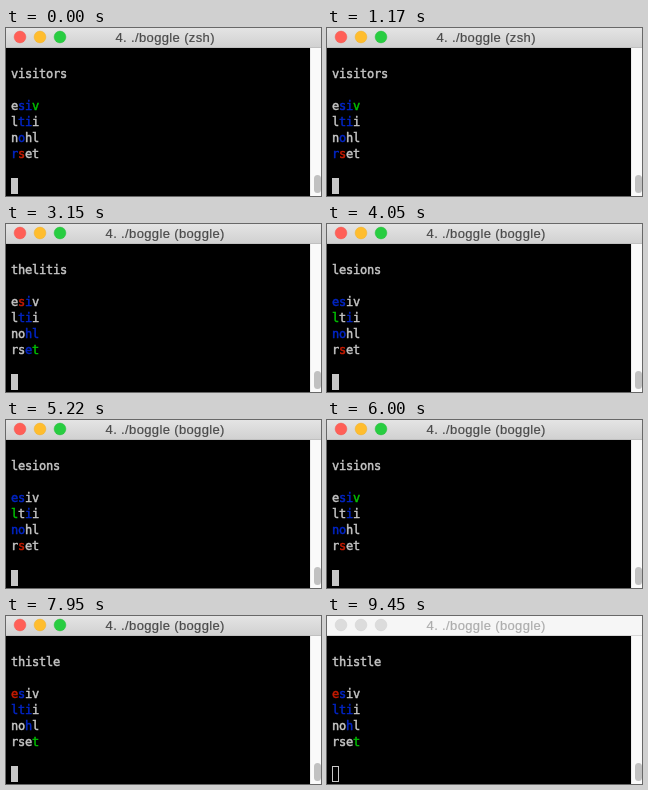
Write an HTML page that moves like this. It is 315x168 px and loops after 9.55 s.

```html
<!DOCTYPE html>
<html lang="en">
<head>
<meta charset="utf-8">
<title>Word grid in a terminal</title>
<style>
  html, body { margin: 0; width: 100%; height: 100%; overflow: hidden; background: #000; }
  svg { display: block; width: 100vw; height: 100vh; }
  .cells { font: 12px "DejaVu Sans Mono", monospace; color: #c7c7c7; }
  .cells text { fill: currentColor; stroke: currentColor; stroke-width: .45; }
  .cells .start { color: #00c200; }
  .cells .mid { color: #0225c7; }
  .cells .end { color: #c91b00; }
  .title {
    font: 13px "Liberation Sans", Arial, sans-serif; letter-spacing: .36px; text-anchor: middle;
    color: #4a4a4a; fill: currentColor; stroke: currentColor; stroke-width: .2;
  }
  .cursor { fill: #c7c7c7; }
  .light { stroke-width: .5; }
  .idle .bar { fill: #f6f6f6; }
  .idle .edge { fill: #d8d8d8; }
  .idle .title { color: #adadad; }
  .idle .light { fill: #dcdcdc; stroke: #d2d2d2; }
  .idle .cursor { fill: none; stroke: #c7c7c7; }
</style>
</head>
<body>
<svg id="stage" viewBox="0 0 315 168">
  <defs>
    <linearGradient id="chrome" x2="0" y2="1">
      <stop stop-color="#e4e4e4"/>
      <stop offset="1" stop-color="#d0d0d0"/>
    </linearGradient>
  </defs>
  <rect width="315" height="168"/>
  <rect x="304" y="20" width="11" height="148" fill="#fafafa"/>
  <rect x="304" y="20" width="1" height="148" fill="#ececec"/>
  <rect x="308" y="147" width="7" height="18" rx="3.5" fill="#c1c1c1"/>
  <rect class="bar" width="315" height="20" fill="url(#chrome)"/>
  <rect class="edge" y="19" width="315" height="1" fill="#c0c0c0"/>
  <circle class="light" cx="14" cy="9" r="5.9" fill="#ff5f57" stroke="#ee5a52"/>
  <circle class="light" cx="34" cy="9" r="5.9" fill="#ffbd2e" stroke="#ecb030"/>
  <circle class="light" cx="54" cy="9" r="5.9" fill="#28cd41" stroke="#28bd3c"/>
  <text class="title" id="title" x="159.2" y="14"></text>
  <g class="cells" id="cells"></g>
  <rect class="cursor" id="cursor"/>
</svg>
<script>
const LOOP = 9550;
const BOARD = "esivltiinohlrset";
const VISITORS = [3, 2, 1, 6, 5, 9, 12, 13];
const THELITIS = [15, 10, 14, 11, 6, 5, 2, 1];
const LESIONS = [4, 0, 1, 6, 9, 8, 13];
const VISIONS = [3, 2, 1, 6, 9, 8, 13];
const THISTLE = [15, 10, 6, 1, 5, 4, 0];

// Each path walks the board from its green cell to its red one.
const STEPS = [
  { at: 0, job: "zsh", path: VISITORS },
  { at: 1950, job: "zsh", path: THELITIS },
  { at: 3150, job: "boggle", path: THELITIS },
  { at: 4050, job: "boggle", path: LESIONS },
  { at: 6000, job: "boggle", path: VISIONS },
  { at: 7950, job: "boggle", path: THISTLE },
  { at: 9450, job: "boggle", path: THISTLE, idle: true }
];

const byId = id => document.getElementById(id);
const stage = byId("stage"), title = byId("title"), cells = byId("cells"), cursor = byId("cursor");

function cell(letter, col, row, kind = "") {
  return `<text class="${kind}" x="${5 + col * 7}" y="${50 + row * 16}">${letter}</text>`;
}

function kindOf(i, path) {
  const n = path.indexOf(i);
  if (n < 0) return "";
  return n === 0 ? "start" : n === path.length - 1 ? "end" : "mid";
}

function setBox(x, y, width, height) {
  for (const [key, value] of Object.entries({ x, y, width, height })) cursor.setAttribute(key, value);
}

function draw({ job, path, idle = false }) {
  stage.classList.toggle("idle", idle);
  title.textContent = `4. ./boggle (${job})`;
  const word = path.map((i, n) => cell(BOARD[i], n, 0));
  const grid = [...BOARD].map((c, i) => cell(c, i % 4, 2 + (i >> 2), kindOf(i, path)));
  cells.innerHTML = word.concat(grid).join("");
  if (idle) setBox(5.5, 150.5, 6, 15);
  else setBox(5, 150, 7, 16);
}

const begin = performance.now();
let shown;

function tick() {
  const t = (performance.now() - begin) % LOOP;
  const step = STEPS.findLast(s => s.at <= t);
  if (step !== shown) draw(shown = step);
  requestAnimationFrame(tick);
}
tick();
</script>
</body>
</html>
```
